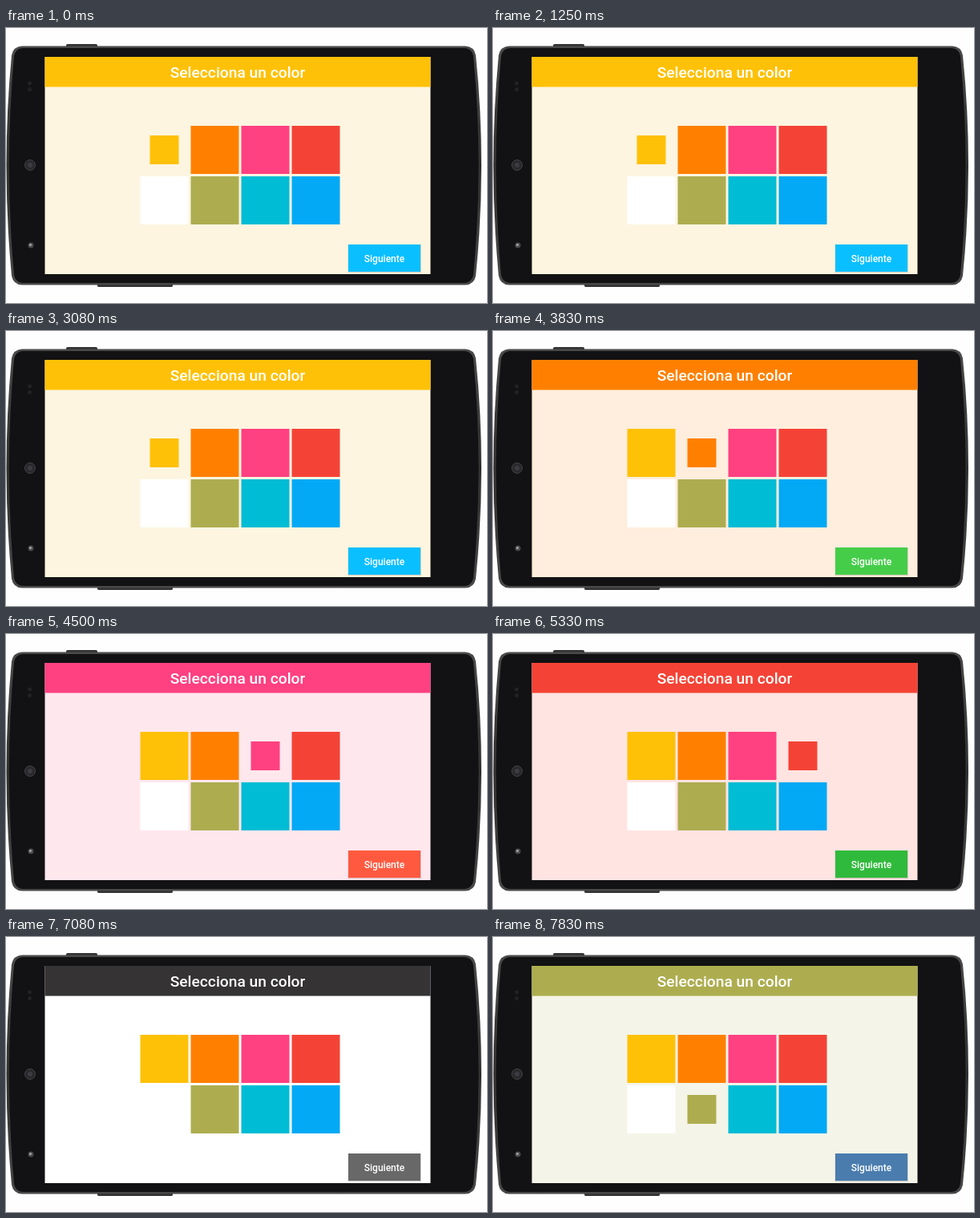
Animation, 600 px wide and 343 px high, one loop 8 s. Source, as an HTML page:

```html
<!DOCTYPE html>
<html lang="es">
<head>
<meta charset="utf-8">
<style>
  html, body { margin: 0; width: 100%; height: 100%; overflow: hidden; background: #fefefe; }
  svg { display: block; width: 600px; height: 343px; }
  text { font-family: Roboto, sans-serif; font-weight: 500; fill: #fff; text-anchor: middle; }
</style>
</head>
<body>
<svg viewBox="0 0 600 343">
  <defs>
    <linearGradient id="rim" x2="0" y2="1">
      <stop offset="0" stop-color="#4a4a4a"/>
      <stop offset=".5" stop-color="#303030"/>
      <stop offset="1" stop-color="#484848"/>
    </linearGradient>
  </defs>
  <path fill="#333" d="M75 24V21.500Q75 20 77 20H112Q114 20 114 21.500V24ZM114 319H208V321.500Q208 323 206 323H116Q114 323 114 321.500Z"/>
  <path fill="url(#rim)" d="M20 22.500H573Q584 23 586 34Q600 171 586 309Q584 320 573 320.500H20Q9 320 7 309Q-6 171 7 34Q9 23 20 22.500Z"/>
  <path fill="#121113" d="M21 25H572Q581 25.500 583 35Q596 171 583 308Q581 317.500 572 318H21Q12 317.500 10 308Q-2 171 10 35Q12 25.500 21 25Z"/>
  <g fill="#222123">
    <circle cx="29.500" cy="69" r="2.500"/>
    <circle cx="29.500" cy="76.500" r="2.500"/>
  </g>
  <circle cx="30" cy="171" r="6.500" fill="#29282b" stroke="#434246"/>
  <circle cx="30" cy="171" r="3" fill="#3d3c42"/>
  <circle cx="31" cy="271" r="3.500" fill="#4a494c"/>
  <circle cx="30.500" cy="270.500" r="1.500" fill="#aaa"/>

  <rect id="screen" x="48.500" y="36" width="481" height="271"/>
  <rect id="header" x="48.500" y="36" width="481" height="37.500"/>
  <text x="289" y="62" font-size="19.2">Selecciona un color</text>
  <g id="swatches"></g>
  <rect x="426.500" y="270" width="91.500" height="35.500" opacity=".12"/>
  <rect id="button" x="427" y="270" width="90" height="34"/>
  <text x="472" y="291.500" font-size="12">Siguiente</text>
</svg>
<script>
const LOOP = 8000, FADE = 200, SIZE = 60, PITCH = 63, SHRINK = 0.4;
const swatchColors = ['#ffc107', '#ff8000', '#ff4081', '#f44336', '#ffffff', '#adad50', '#00bcd4', '#03a9f4'];

// Each selection: start time, swatch index and the theme it applies.
const themes = [
  { at: 0,    pick: 0, header: '#ffc107', screen: '#fdf5e0', button: '#0abfff' },
  { at: 3290, pick: 1, header: '#ff8000', screen: '#ffeedd', button: '#45cd4a' },
  { at: 4165, pick: 2, header: '#ff4081', screen: '#ffe7ee', button: '#ff5a40' },
  { at: 4915, pick: 3, header: '#f44336', screen: '#ffe4e2', button: '#30ba3c' },
  { at: 6205, pick: 4, header: '#353334', screen: '#ffffff', button: '#686868' },
  { at: 7455, pick: 5, header: '#adad50', screen: '#f4f4e8', button: '#4a7cae' }
];

const byId = id => document.getElementById(id);
const swatches = swatchColors.map(color => {
  const rect = document.createElementNS('http://www.w3.org/2000/svg', 'rect');
  rect.setAttribute('fill', color);
  return byId('swatches').appendChild(rect);
});

const channels = hex => [1, 3, 5].map(i => parseInt(hex.slice(i, i + 2), 16));
function mix(from, to, k) {
  const end = channels(to);
  return `rgb(${channels(from).map((v, i) => Math.round(v + (end[i] - v) * k))})`;
}

function draw(now) {
  const t = now % LOOP;
  const current = themes.findLastIndex(theme => t >= theme.at);
  const next = themes[current];
  const previous = themes[Math.max(0, current - 1)];
  const p = Math.min(1, (t - next.at) / FADE);
  const k = p * p * (3 - 2 * p);

  for (const part of ['header', 'screen', 'button'])
    byId(part).setAttribute('fill', mix(previous[part], next[part], k));

  swatches.forEach((rect, i) => {
    const selected = (i === previous.pick) * (1 - k) + (i === next.pick) * k;
    const size = SIZE * (1 - SHRINK * selected);
    const inset = (SIZE - size) / 2;
    rect.setAttribute('x', 167.500 + i % 4 * PITCH + inset);
    rect.setAttribute('y', 122 + Math.floor(i / 4) * PITCH + inset);
    rect.setAttribute('width', size);
    rect.setAttribute('height', size);
  });
}

const start = performance.now();
function tick() {
  draw(performance.now() - start);
  requestAnimationFrame(tick);
}
tick();
</script>
</body>
</html>
```
